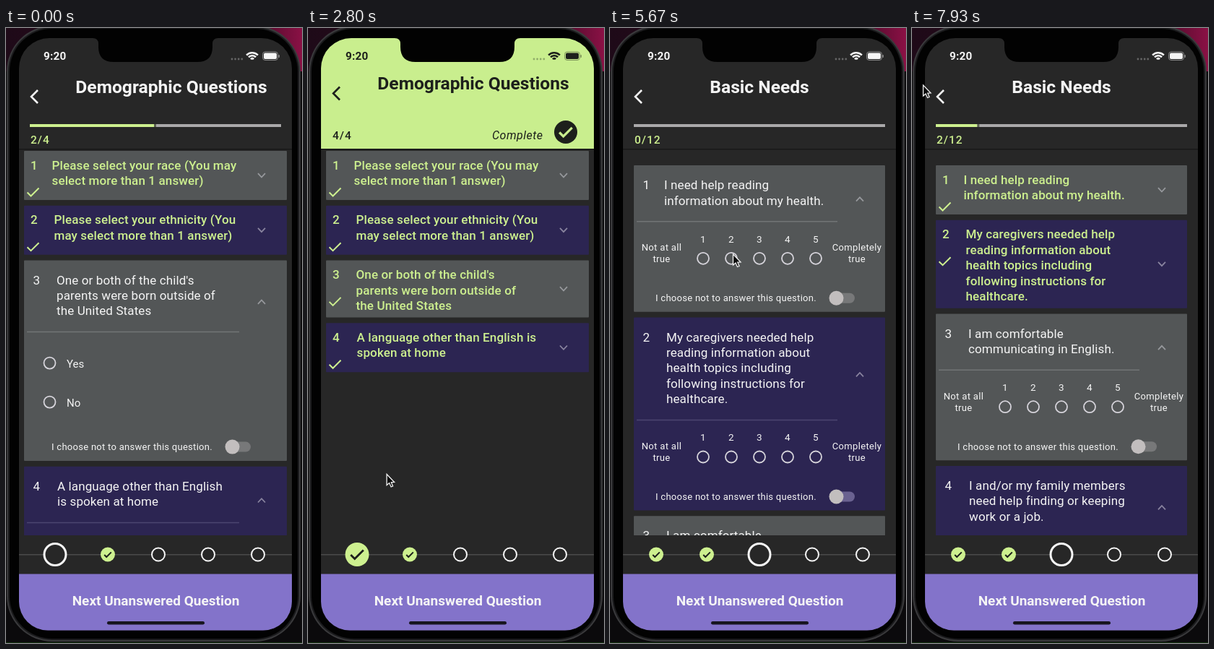
Write an HTML page with a canvas that moves like this. It is 410 by 851 pixels and loops after 8 s.

```html
<!DOCTYPE html>
<html lang="en">
<head>
<meta charset="utf-8">
<title>Questionnaire</title>
<style>
html, body { margin: 0; width: 100%; height: 100%; overflow: hidden; background: #000; }
canvas { display: block; width: 410px; height: 851px; }
</style>
</head>
<body>
<canvas id="stage"></canvas>
<script>
const canvas = document.getElementById('stage');
const ratio = window.devicePixelRatio || 1;
canvas.width = 410 * ratio;
canvas.height = 851 * ratio;
const ctx = canvas.getContext('2d');

const LOOP = 8000, COLLAPSE = 300, LINE = 21.4, GAP = 7.7;
const C = {
  bg: '#272727', grey: '#535657', purple: '#2c2552', lime: '#cdf08f',
  white: '#f5f5f5', ink: '#1d201c', button: '#8373ca'
};
const SWAP = 3730, COMPLETE = 2520, PRESS = 3480;

const pages = [
  {
    title: 'Demographic Questions', titleX: 229, left: 25, right: 389, top: 170, total: 4,
    bigStep: 0, steps: [68, 141, 211, 280, 349], kind: 'choice',
    cards: [
      { lines: ['Please select your race (You may', 'select more than 1 answer)'], at: -1000 },
      { lines: ['Please select your ethnicity (You', 'may select more than 1 answer)'], at: -1000 },
      { lines: ["One or both of the child's", 'parents were born outside of', 'the United States'], at: 1100, pick: 1 },
      { lines: ['A language other than English', 'is spoken at home'],
        short: ['A language other than English is', 'spoken at home'], at: 2260, pick: 1 }
    ]
  },
  {
    title: 'Basic Needs', titleX: 207, left: 33, right: 381, top: 190, total: 12,
    bigStep: 2, steps: [64, 134, 207, 280, 350], kind: 'rating',
    cards: [
      { lines: ['I need help reading', 'information about my health.'], at: 5750, pick: 1 },
      { lines: ['My caregivers needed help', 'reading information about', 'health topics including',
        'following instructions for', 'healthcare.'], at: 6957, pick: 2 },
      { lines: ['I am comfortable', 'communicating in English.'], at: Infinity },
      { lines: ['I and/or my family members', 'need help finding or keeping', 'work or a job.'], at: Infinity }
    ]
  }
];

// time, x, y of the pointer tip
const pointerPath = [
  [100, 425, 600], [800, 108, 520], [1350, 100, 519], [1900, 101, 583], [2650, 101, 583],
  [3250, 149, 801], [4540, 149, 801], [5270, 186, 244], [5530, 170, 313], [6020, 170, 313],
  [6670, 201, 453], [6870, 204, 454], [7000, 209, 455], [7120, 209, 455], [7800, 17, 82], [7930, 15, 79]
];

const clamp = v => Math.max(0, Math.min(1, v));
const smooth = v => { v = clamp(v); return v * v * (3 - 2 * v); };
const mix = (a, b, p) => a + (b - a) * p;

function text(s, x, y, size, { weight = 400, color = C.white, align = 'left', gap = 0, italic = '' } = {}) {
  ctx.font = `${italic} ${weight} ${size}px Roboto, sans-serif`;
  ctx.letterSpacing = gap + 'px';
  ctx.textAlign = align;
  ctx.fillStyle = color;
  ctx.fillText(s, x, y + size * 0.35);
}
function box(x, y, w, h, color, r = 0) {
  ctx.fillStyle = color;
  ctx.beginPath();
  ctx.roundRect(x, y, w, h, r);
  ctx.fill();
}
function disc(x, y, r, color) {
  ctx.fillStyle = color;
  ctx.beginPath();
  ctx.arc(x, y, r, 0, Math.PI * 2);
  ctx.fill();
}
function ring(x, y, r, width, color) {
  ctx.strokeStyle = color;
  ctx.lineWidth = width;
  ctx.beginPath();
  ctx.arc(x, y, r, 0, Math.PI * 2);
  ctx.stroke();
}
function line(points, width, color) {
  ctx.strokeStyle = color;
  ctx.lineWidth = width;
  ctx.beginPath();
  points.forEach(([x, y]) => ctx.lineTo(x, y));
  ctx.stroke();
}
function check(x, y, k, width, color) {
  line([[x - 8 * k, y], [x - 3 * k, y + 5 * k], [x + 8 * k, y - 6 * k]], width, color);
}
function clipped(x, y, w, h, draw) {
  ctx.save();
  ctx.beginPath();
  ctx.rect(x, y, w, Math.max(0, h));
  ctx.clip();
  draw();
  ctx.restore();
}

function radio(x, y, picked) {
  ring(x, y, 8, 1.8, '#d5d3da');
  if (picked > 0) disc(x, y, 4.5 * picked, '#e8e6ee');
}
function declineRow(y, purple) {
  text('I choose not to answer this question.', 63, y, 13, { gap: 0.28 });
  box(306, y - 7, 33, 14, purple ? '#6a6290' : '#777879', 7);
  disc(313.5, y, 10, '#c2bebe');
}
function answers(kind, y, purple, pick, p) {
  const picked = i => i === pick ? p : 0;
  if (kind === 'choice') {
    ['Yes', 'No'].forEach((label, i) => {
      radio(60.5, y + 43 + i * 54, picked(i));
      text(label, 84, y + 44 + i * 54, 15);
    });
    declineRow(y + 159, purple);
    return;
  }
  const small = { align: 'center', gap: 0.35 };
  for (let i = 0; i < 5; i++) {
    text(i + 1, 129 + i * 39, y + 24, 13.5, small);
    radio(129 + i * 39, y + 51, picked(i));
  }
  ['Not at all', 'true'].forEach((s, i) => text(s, 71.5, y + 36 + i * 16, 13, small));
  ['Completely', 'true'].forEach((s, i) => text(s, 342, y + 36 + i * 16, 13, small));
  declineRow(y + 106, purple);
}

// Draws one card and returns its height.
function drawCard(page, card, index, y, t) {
  const { left, right, kind } = page;
  const p = smooth((t - card.at) / COLLAPSE);
  const answered = p > 0;
  const purple = index % 2 === 1;
  const lines = answered && card.short || card.lines;
  const openHead = 35 + LINE * lines.length;
  const shutHead = Math.max(68, 15 + LINE * lines.length);
  const head = mix(openHead, shutHead, p);
  const height = mix(openHead + (kind === 'choice' ? 178.5 : 125), shutHead, p);
  const color = answered ? C.lime : C.white;
  const style = { color, weight: answered ? 500 : 400, gap: 0.12 };

  box(left, y, right - left, height, purple ? C.purple : C.grey, 1);
  if (p < 1) {
    clipped(left, y + head, right - left, height - head, () => {
      ctx.globalAlpha = clamp(2.5 * (0.85 - p));
      answers(kind, y + openHead - 74 * p, purple, card.pick, p);
    });
  }
  if (!answered) {
    line([[left + 4, y + openHead], [right - 66, y + openHead]], 1.5, purple ? '#4b4570' : '#727576');
  }

  const firstLine = y + mix(27.2, 19.8, p);
  const textX = left + [42, 45, 45, 46][index] - 3.5 * p;
  text(index + 1, left + 12.5 - 3.5 * p, firstLine, 17, style);
  lines.forEach((s, i) => text(s, textX, firstLine + i * LINE, 17, style));
  if (answered) check(left + 16.5 - 4 * p, y + 65.5 - 8 * p, 1, 2, C.lime);

  ctx.save();
  ctx.translate(right - 35, y + head / 2 + mix(8, 0, p));
  ctx.rotate(-Math.PI * p);
  line([[-5, 2.8], [0, -2.5], [5, 2.8]], 1.8, purple ? '#89849f' : '#96989c');
  ctx.restore();
  return height;
}

function drawHeader(page, done, complete) {
  const ink = complete ? C.ink : C.white;
  const up = complete ? -4.5 : 0;
  if (complete) box(18, 0, 378, 167, '#c9ee8e');
  box(18, 167, 378, 1.5, '#181818');
  text(page.title, page.titleX, 81 + up, 24.6, { weight: 700, color: ink, align: 'center' });
  line([[44, 86 + up], [35, 95 + up], [44, 104 + up]], 2.6, ink);
  text(`${done}/${page.total}`, 34, complete ? 148.5 : 155, 15.5,
    { weight: 500, color: complete ? C.ink : C.lime, gap: 1 });

  if (complete) {
    text('Complete', 255, 148.5, 16, { color: C.ink, italic: 'italic', gap: 0.5 });
    disc(357, 144, 16, C.ink);
    check(357, 144.5, 1.1, 3.2, '#c9ee8e');
  } else {
    const filled = 344 * done / page.total;
    box(33, 133, 348, 4, '#aaa9aa');
    if (done) {
      box(33, 133, filled, 4, C.lime);
      box(33 + filled, 133, 3, 4, '#5c6150');
    }
  }

  text('9:20', 52, 39, 15.3, { weight: 700, color: ink, gap: 0.2 });
  for (let i = 0; i < 4; i++) disc(313 + i * 4.6, 43, 1.4, complete ? '#8fab68' : '#666');
  for (const r of [4, 8, 12]) {
    ctx.strokeStyle = ink;
    ctx.lineWidth = 2.6;
    ctx.beginPath();
    ctx.arc(341, 45, r - 1.2, -Math.PI * 0.76, -Math.PI * 0.24);
    ctx.stroke();
  }
  ctx.strokeStyle = complete ? '#7d9459' : '#8a8a8a';
  ctx.lineWidth = 1;
  ctx.beginPath();
  ctx.roundRect(355.5, 33, 21, 11.5, 3.5);
  ctx.stroke();
  box(357, 34.5, 18, 8.5, ink, 2);
  box(377.5, 37, 1.5, 4, ctx.strokeStyle, 1);
}

function drawSteps(page, complete) {
  box(18, 702, 378, 54, C.bg);
  box(18, 728, 378, 1.5, '#4a4a4a');
  page.steps.forEach((x, i) => {
    const big = i === page.bigStep;
    if (big && complete) {
      disc(x, 728.5, 16.5, C.lime);
      check(x, 729, 1.1, 2.8, C.ink);
    } else if (!big && i <= 1) {
      disc(x, 728.5, 10, C.lime);
      check(x, 729, 0.6, 2, C.ink);
    } else {
      const r = big ? 15 : 9;
      disc(x, 728.5, r, C.bg);
      ring(x, 728.5, r, big ? 3 : 2, C.white);
    }
  });
}

function drawButton(t) {
  box(18, 755.5, 378, 80, C.button);
  const fade = clamp((t - PRESS) / 90) * (1 - clamp((t - 3700) / 200));
  if (fade > 0) {
    clipped(18, 755.5, 378, 80, () => {
      ctx.globalAlpha = fade;
      box(18, 755.5, 378, 80, '#9488d2');
      disc(155, 801, 75 * smooth((t - PRESS + 120) / 240), '#aaa2dc');
    });
  }
  text('Next Unanswered Question', 207.5, 792, 19, { weight: 700, align: 'center' });
  box(140, 821, 135, 4.5, '#17151f', 2.3);
}

function drawBackdrop() {
  const glow = ctx.createLinearGradient(0, 0, 410, 0);
  glow.addColorStop(0, '#1e0a18');
  glow.addColorStop(0.8, '#3a0720');
  glow.addColorStop(1, '#8a1145');
  box(0, 0, 410, 851, '#0b0a0c');
  box(0, 0, 410, 60, glow);
  box(0, 850, 410, 1, '#12300f');
  box(1, -3, 407, 852, '#3a3a3c', 63);
  box(3, -1, 403, 848, '#1b1b1d', 61);
  box(5, 1, 399, 844, '#020202', 59);
}

function drawNotch() {
  ctx.fillStyle = '#020202';
  ctx.beginPath();
  ctx.moveTo(120, 12);
  ctx.lineTo(120, 14);
  ctx.quadraticCurveTo(128, 14, 128, 22);
  ctx.lineTo(128, 26);
  ctx.quadraticCurveTo(128, 47, 149, 47);
  ctx.lineTo(265, 47);
  ctx.quadraticCurveTo(286, 47, 286, 26);
  ctx.lineTo(286, 22);
  ctx.quadraticCurveTo(286, 14, 294, 14);
  ctx.lineTo(294, 12);
  ctx.fill();
}

function drawPointer(t) {
  if (t < pointerPath[0][0]) return;
  let [, x, y] = pointerPath[pointerPath.length - 1];
  const next = pointerPath.findIndex(k => k[0] > t);
  if (next > 0) {
    const a = pointerPath[next - 1], b = pointerPath[next];
    const p = smooth((t - a[0]) / (b[0] - a[0]));
    x = mix(a[1], b[1], p);
    y = mix(a[2], b[2], p);
  }
  ctx.save();
  ctx.translate(x, y);
  ctx.beginPath();
  [[0.5, 0], [0.5, 15], [4, 12], [6.5, 17.5], [9, 16.5], [6.7, 11.2], [11, 11]]
    .forEach(([px, py]) => ctx.lineTo(px, py));
  ctx.closePath();
  ctx.fillStyle = '#0a0a0a';
  ctx.strokeStyle = '#f0f0f0';
  ctx.lineWidth = 1.3;
  ctx.fill();
  ctx.stroke();
  ctx.restore();
}

function draw(t) {
  ctx.setTransform(ratio, 0, 0, ratio, 0, 0);
  const page = pages[t < SWAP ? 0 : 1];
  const complete = t >= COMPLETE && t < SWAP;
  const done = page.cards.filter(card => t > card.at).length;

  drawBackdrop();
  ctx.save();
  ctx.beginPath();
  ctx.roundRect(18, 14, 378, 819.5, [42, 42, 40, 40]);
  ctx.clip();
  box(18, 14, 378, 820, C.bg);
  drawHeader(page, done, complete);
  clipped(18, 168, 378, 534, () => {
    let y = page.top;
    page.cards.forEach((card, i) => { y += drawCard(page, card, i, y, t) + GAP; });
  });
  drawSteps(page, complete);
  drawButton(t);
  ctx.restore();
  drawNotch();
  drawPointer(t);
}

const start = performance.now();
function frame(now) {
  draw(Math.max(0, now - start) % LOOP);
  requestAnimationFrame(frame);
}
draw(0);
requestAnimationFrame(frame);
</script>
</body>
</html>
```
